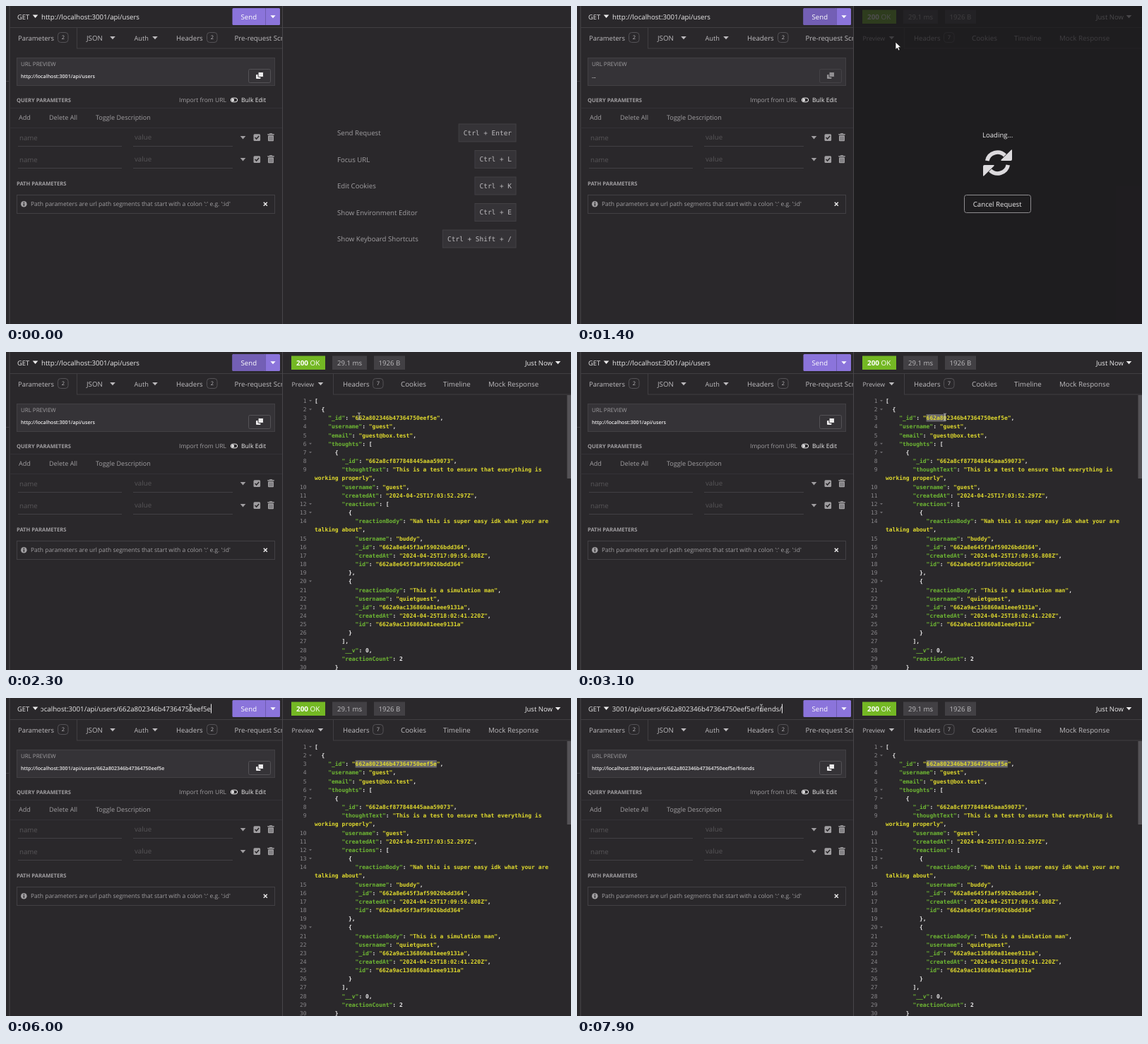
Write an HTML page that moves like this. It is 800 px wide and 450 px high and loops after 8000 ms.

```html
<!DOCTYPE html>
<html lang="en">
<head>
<meta charset="utf-8">
<title>API client</title>
<style>
  html, body { margin: 0; width: 100%; height: 100%; overflow: hidden; background: #2a282b; }
  svg { display: block; width: 800px; height: 450px; font-family: "Open Sans", "Noto Sans", sans-serif; }
  text { white-space: pre; text-rendering: geometricPrecision; }
  .mono { font-family: "DejaVu Sans Mono", "Noto Sans Mono", monospace; }
  .code { font-weight: 700; }
</style>
</head>
<body>
<svg id="stage" viewBox="0 0 800 450" xmlns="http://www.w3.org/2000/svg"></svg>
<script>
const LOOP = 8000, STEP = 100;
const BG = '#2a282b', LINE = '#403e42', PANEL = '#353337', EDGE = '#424044';
const TEXT = '#bdbbbe', DIM = '#a09ea1', FAINT = '#575558', WHITE = '#ecebec';
const GREEN = '#6fb834', YELLOW = '#e0da2e', PURPLE = '#8b74db';
const BASE = 'http://localhost:3001/api/users';
const ID = '662a802346b47364750eef5e';
const ROW = 12.16, CHAR = 4.8, CODE_X = 437, CODE_SIZE = 7.97;

const text = (x, y, s, size = 9.6, fill = TEXT, extra = '') =>
  `<text x="${x}" y="${y}" font-size="${size}" fill="${fill}" ${extra}>${s}</text>`;
const rect = (x, y, w, h, fill, stroke = 'none', r = 0) =>
  `<rect x="${x}" y="${y}" width="${w}" height="${h}" rx="${r}" fill="${fill}" stroke="${stroke}"/>`;
const hline = (x1, x2, y, c = LINE) => rect(x1, y, x2 - x1, 1, c);
const vline = (x, y1, y2, c = LINE) => rect(x, y1, 1, y2 - y1, c);
const down = (x, y, r = 3.8, fill = TEXT) =>
  `<path d="M${x - r} ${y - r / 2}h${2 * r}l${-r} ${r * 1.15}z" fill="${fill}"/>`;
const badge = (x, n) => rect(x + .5, 37.5, 14.5, 14, 'none', '#545256', 4) +
  text(x + 7.8, 47.3, n, 7.5, TEXT, 'text-anchor="middle"');
const group = (id, body) => `<g id="${id}">${body}</g>`;

function paramRow(y) {
  return text(19, y + 3.6, 'name', 9.7, FAINT) + text(182, y + 3.2, 'value', 9.7, FAINT) +
    hline(17, 164, y + 12, EDGE) + hline(180, 321, y + 12, EDGE) + down(335.5, y, 3.8, DIM) +
    rect(350.5, y - 4.7, 9.6, 9.6, DIM, 'none', 1.5) +
    `<path d="M352.6 ${y}l2 2.1l3.6-4" fill="none" stroke="${BG}" stroke-width="1.5"/>` +
    rect(370.3, y - 5, 9.4, 1.5, DIM) + rect(373, y - 5.8, 4, 1.5, DIM) +
    rect(371, y - 2.8, 8, 8, DIM, 'none', 1) +
    [373, 375, 377].map(x => vline(x - .4, y - 1.3, y + 4, '#68666a')).join('');
}

function leftPane() {
  return vline(4.5, 0, 450, '#4a484c') + hline(0, 5, 106) + vline(391, 0, 450, '#48464a') +
    hline(5, 391, 30) +
    text(16, 18.6, 'GET', 9.3, WHITE) + down(41.5, 14.5, 3.8, WHITE) +
    `<clipPath id="urlClip"><rect x="49.5" y="2" width="242" height="27"/></clipPath>
     <g clip-path="url(#urlClip)">${text(50, 18.6, BASE, 9.68, WHITE, 'id="url"')}</g>` +
    group('caret', rect(290, 8.5, 1, 13, WHITE)) +
    rect(320.5, 3, 67.5, 24, PURPLE, 'none', 1.5) +
    group('sendFocus', rect(320.5, 3, 46.5, 24, '#735fb5', 'none', 1.5)) +
    vline(367, 3, 27, '#6f5cb0') + text(332.6, 19, 'Send', 9.6, '#fff') + down(378, 15, 3.6, '#fff') +
    text(17, 48.7, 'Parameters', 9.45) + badge(73, 2) + vline(100, 31, 60) +
    text(114, 48.7, 'JSON', 9.7) + down(151, 44.8) +
    text(181.5, 48.7, 'Auth', 9.2) + down(211, 44.8) +
    text(241, 48.7, 'Headers', 9.65) + badge(284, 2) +
    `<clipPath id="tabClip"><rect x="5" y="31" width="386" height="29"/></clipPath>
     <g clip-path="url(#tabClip)">${text(323.5, 48.7, 'Pre-request Scripts', 9.7)}</g>` +
    hline(100, 391, 59.5) + group('tabScroll', rect(6, 59.5, 323, 3.5, '#4f4d51')) +
    rect(15.5, 73.5, 365, 39, PANEL, EDGE) + text(21, 85.2, 'URL PREVIEW', 7.95, DIM) +
    text(21, 102.3, BASE, 7.05, WHITE, 'id="preview" font-weight="600"') +
    group('copy', rect(343.5, 89.5, 31, 19, PANEL, '#545256', 2) +
      rect(354, 97, 6.5, 6, WHITE, 'none', 1) + rect(357, 93.5, 7.5, 7, WHITE, PANEL, 1.3)) +
    text(15, 135.8, 'QUERY PARAMETERS', 7.6, DIM, 'font-weight="700"') +
    text(245, 136.2, 'Import from URL', 8.55, DIM) +
    rect(318.3, 130.2, 9.4, 5.6, 'none', WHITE, 2.8) +
    `<circle cx="321.2" cy="133" r="1.9" fill="${WHITE}"/>` + text(333, 136.2, 'Bulk Edit', 8.6, WHITE) +
    hline(5, 391, 144, '#343236') + hline(5, 391, 172, '#343236') +
    text(18, 161.4, 'Add', 9.1, DIM) + text(61, 161.4, 'Delete All', 9.05, DIM) +
    text(127, 161.4, 'Toggle Description', 9.05, DIM) +
    paramRow(186) + paramRow(217) +
    text(15, 254.3, 'PATH PARAMETERS', 7.6, DIM, 'font-weight="700"') +
    rect(15.5, 267.5, 365, 26, 'none', EDGE) +
    `<circle cx="25.3" cy="280.3" r="4.3" fill="${DIM}"/>` +
    rect(24.6, 279.4, 1.5, 3.4, BG) + rect(24.6, 277.2, 1.5, 1.4, BG) +
    text(35, 283.4, "Path parameters are url path segments that start with a colon ':' e.g. ':id'", 8.47, DIM) +
    `<path d="M364.8 277.8l5 5m0-5l-5 5" stroke="${WHITE}" stroke-width="1.5"/>`;
}

function shortcuts() {
  const rows = [['Send Request', 'Ctrl + Enter'], ['Focus URL', 'Ctrl + L'], ['Edit Cookies', 'Ctrl + K'],
    ['Show Environment Editor', 'Ctrl + E'], ['Show Keyboard Shortcuts', 'Ctrl + Shift + /']];
  return rows.map(([label, keys], i) => {
    const y = 179.5 + i * 37.5, w = keys.length * 5.7 + 12.5;
    return text(469, y + 3.7, label, 9.65, DIM) +
      rect(722 - w, y - 12.5, w, 25, PANEL, EDGE) +
      text(716, y + 3.2, keys, 9.45, TEXT, 'class="mono" text-anchor="end"');
  }).join('');
}

function responseHead() {
  return rect(404, 5.5, 48, 19.5, '#74b824') +
    text(411, 18.7, '<tspan font-weight="700">200</tspan> OK', 9.9, '#fff') +
    rect(462, 5.5, 49, 19.5, '#424044') + text(469, 18.6, '29.1 ms', 9.6) +
    rect(521, 5.5, 44, 19.5, '#424044') + text(527.5, 18.6, '1926 B', 9.6) +
    text(735, 18.6, 'Just Now', 9.5, WHITE) + down(781.5, 14.8, 3.8, WHITE) +
    text(404.5, 48.5, 'Preview', 8.8) + down(445.5, 44.8) + vline(463, 31, 60) +
    text(477, 48.7, 'Headers', 9.6) + badge(519, 7) + text(559, 48.7, 'Cookies', 9.8) +
    text(619, 48.7, 'Timeline', 9.75) + text(683, 48.7, 'Mock Response', 9.75) + hline(463, 800, 59.5);
}

// Rows starting with "~" continue the wrapped line above.
const JSON_ROWS = `[
  {
    "_id": "${ID}",
    "username": "guest",
    "email": "guest@box.test",
    "thoughts": [
      {
        "_id": "662a8cf877848445aaa59073",
        "thoughtText": "This is a test to ensure that everything is
~working properly",
        "username": "guest",
        "createdAt": "2024-04-25T17:03:52.297Z",
        "reactions": [
          {
            "reactionBody": "Nah this is super easy idk what your are
~talking about",
            "username": "buddy",
            "_id": "662a8e645f3af59026bdd364",
            "createdAt": "2024-04-25T17:09:56.808Z",
            "id": "662a8e645f3af59026bdd364"
          },
          {
            "reactionBody": "This is a simulation man",
            "username": "quietguest",
            "_id": "662a9ac136860a81eee9131a",
            "createdAt": "2024-04-25T18:02:41.220Z",
            "id": "662a9ac136860a81eee9131a"
          }
        ],
        "__v": 0,
        "reactionCount": 2
      }`.split('\n');

function codeRows() {
  const span = (s, c) => `<tspan fill="${c}">${s}</tspan>`;
  let n = 0;
  return JSON_ROWS.map((row, i) => {
    const y = 72 + i * ROW;
    const wrapped = row[0] === '~', body = wrapped ? row.slice(1) : row.trimStart();
    const x = CODE_X + (wrapped ? 0 : row.length - body.length) * CHAR;
    let out = '';
    if (!wrapped) {
      out += text(425.5, y, ++n, CODE_SIZE, '#88868a', 'class="mono" text-anchor="end"');
      if (/[[{]$/.test(body)) out += down(431, y - 3, 2, '#6c6a6e');
    }
    const colored = wrapped
      ? body.replace(/^([^"]*")(.*)$/, (m, a, b) => span(a, YELLOW) + span(b, WHITE))
      : body.replace(/"[^"]*"(?=:)|"[^"]*"?|[^"]+/g, (m, at) =>
          span(m, m[0] !== '"' ? WHITE : at === 0 ? GREEN : YELLOW));
    return out + text(x, y, colored, CODE_SIZE, WHITE, 'class="mono code"');
  }).join('');
}

function loading() {
  const half = `<path d="M-14.8 -3A15 15 0 0 1 10.5 -10.5" fill="none" stroke="#dcdadd" stroke-width="5.6"/>
    <path d="M19.5 -18.5q1-.6 1 1V-5q0 2-2 2H6q-2 0-.8-1.4z" fill="#dcdadd"/>`;
  return rect(392, 0, 408, 450, 'rgba(28,26,29,.78)') +
    text(574, 185.6, 'Loading...', 9.6, WHITE) +
    `<g transform="translate(595.5 222)"><g id="spin">${half}<g transform="rotate(180)">${half}</g></g></g>` +
    rect(548.5, 267.5, 94, 25, 'none', '#8f8d90', 3) + text(560.8, 284, 'Cancel Request', 9.65, WHITE);
}

const stage = document.getElementById('stage');
stage.innerHTML = rect(0, 0, 800, 450, BG) + leftPane() + hline(392, 800, 30) +
  group('shortcuts', shortcuts()) + group('head', responseHead()) +
  group('code', '<rect id="sel" y="88" height="10.5" fill="#68666b"/>' + codeRows() +
    rect(794.5, 61, 5.5, 118, '#545256')) +
  group('loading', loading()) +
  group('arrow', '<path d="M0 0v10.6l2.5-2.3l1.7 3.8l1.9-.8l-1.7-3.7h3.4z" fill="#fff" stroke="#111" stroke-width=".7"/>') +
  group('beam', '<path d="M-2-5q2 0 2 1.2q0-1.2 2-1.2M0-4V4M-2 5q2 0 2-1.2q0 1.2 2 1.2" fill="none" stroke="#d0d0d0" stroke-width=".8"/>');

const el = {};
stage.querySelectorAll('[id]').forEach(e => el[e.id] = e);
const show = (id, on) => el[id].setAttribute('display', on ? 'inline' : 'none');

// time, x, y
const PATH = [[100, 225, 16], [600, 343, 14], [1000, 343, 14], [1400, 451, 51], [1700, 476, 72],
  [2300, 500, 91], [2600, 494, 93], [3100, 521, 92], [3700, 611, 94], [4000, 611, 94],
  [4600, 350, 37], [5000, 261, 14], [8000, 261, 14]];
// time, text added to the address
const KEYS = [[5300, '/'], [5700, ID], [6500, '/'], [7100, 'f'], [7200, 'r'], [7300, 'i'],
  [7400, 'e'], [7500, 'n'], [7600, 'd'], [7700, 's'], [7900, '/']];
const typed = t => BASE + KEYS.filter(k => k[0] <= t).map(k => k[1]).join('');

function pointer(t) {
  let i = 0;
  while (i < PATH.length - 2 && PATH[i + 1][0] <= t) i++;
  const [t0, x0, y0] = PATH[i], [t1, x1, y1] = PATH[i + 1];
  const p = Math.min(1, Math.max(0, (t - t0) / (t1 - t0))), e = p * p * (3 - 2 * p);
  return [x0 + (x1 - x0) * e, y0 + (y1 - y0) * e];
}

function draw(t) {
  const busy = t >= 1200 && t < 1500;
  show('shortcuts', t < 1200);
  show('head', t >= 1200);
  show('code', t >= 1500);
  show('loading', busy);
  show('sendFocus', t >= 1000 && t < 2600);
  el.copy.setAttribute('opacity', busy ? .5 : 1);
  el.spin.setAttribute('transform', `rotate(${(t - 1400) * .18})`);

  const [x, y] = pointer(t);
  const beam = y < 29 ? x < 310 : x > CODE_X && y > 63;
  show('arrow', t >= 100 && !beam);
  show('beam', t >= 100 && beam);
  el[beam ? 'beam' : 'arrow'].setAttribute('transform', `translate(${x} ${y})`);
  show('tabScroll', x < 391 && y > 30 && y < 62);

  const start = CODE_X + 12 * CHAR, full = 24 * CHAR;
  const dragged = Math.min(full, Math.max(0, x + 1 - start));
  el.sel.setAttribute('x', start);
  el.sel.setAttribute('width', t < 2700 ? 0 : t >= 3700 ? full : dragged);

  el.url.textContent = typed(t);
  el.preview.textContent = busy ? '...' : typed(t - 100);
  const len = el.url.getComputedTextLength();
  el.url.setAttribute('x', 50 - Math.max(0, len - 240));
  const last = KEYS.reduce((a, k) => k[0] <= t ? k[0] : a, 5000);
  show('caret', t >= 5000 && (t - last) % 1000 < 500);
  el.caret.setAttribute('transform', `translate(${Math.min(0, len - 240)} 0)`);
}

function tick() {
  draw(Math.floor(performance.now() % LOOP / STEP) * STEP);
  requestAnimationFrame(tick);
}
tick();
</script>
</body>
</html>
```
